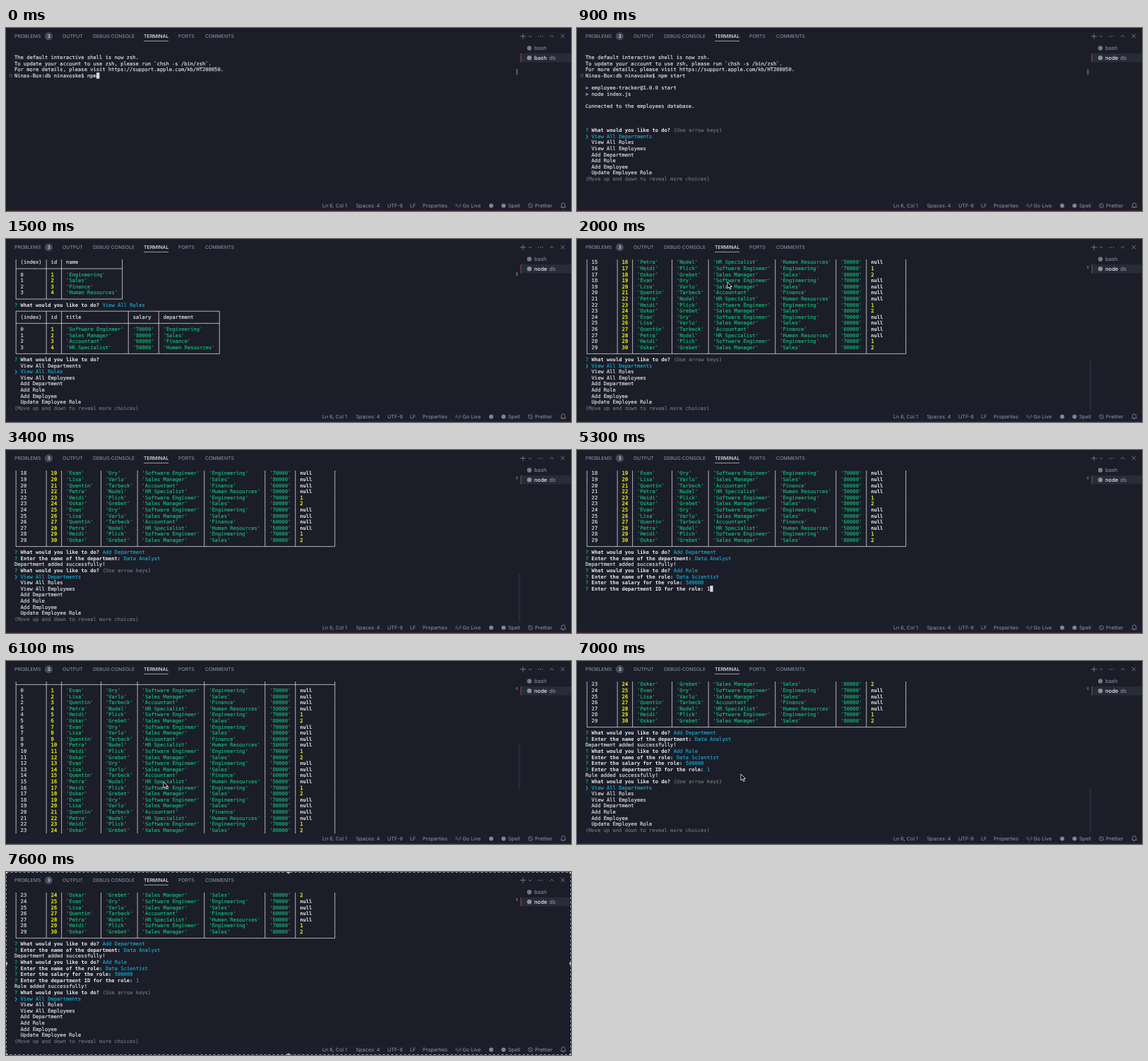
Animation of 800 by 259 pixels, one loop 7.7 s. Source, as an HTML page:

```html
<!DOCTYPE html>
<html lang="en">
<head>
<meta charset="utf-8">
<title>Terminal</title>
<style>
html, body { margin: 0; width: 100%; height: 100%; overflow: hidden; background: #1b1d28; }
svg { display: block; width: 100vw; height: 100vh; }
text { white-space: pre; text-rendering: geometricPrecision; }
#ui text { font: 7.2px Inter, "Open Sans", sans-serif; fill: #9298a7; }
#ui .tab text { font-size: 6.9px; }
#ui .list text { font-size: 7.6px; }
#ui .on { fill: #e8eaf0; font-weight: 500; }
.icon { fill: none; stroke: #9298a7; stroke-width: .7; }
#term text { font: 7.143px "DejaVu Sans Mono", "Liberation Mono", monospace; fill: currentColor; stroke: currentColor; stroke-width: .16; }
#term .w { color: #e2e3e8; }
#term .b { color: #e8e9ee; font-weight: bold; stroke: none; }
#term .g { color: #14bc7b; }
#term .y { color: #e8e81c; stroke-width: .3; }
#term .c { color: #17a8cd; }
#term .d { color: #6f727c; }
#term path { fill: none; stroke: #d3d4da; stroke-width: .85; }
</style>
</head>
<body>
<svg viewBox="0 0 800 259">
  <rect width="800" height="259" fill="#1b1d28"/>
  <rect y="244.5" width="800" height="14.5" fill="#1c1f2b"/>
  <rect y="258" width="800" height="1" fill="#42202f"/>
  <g id="ui">
    <g class="tab">
      <text x="12" y="14.2">PROBLEMS</text>
      <circle cx="60.5" cy="11.7" r="5.6" fill="#444957"/>
      <text x="58.4" y="14.2" class="on">3</text>
      <text x="80" y="14.2">OUTPUT</text>
      <text x="123" y="14.2">DEBUG CONSOLE</text>
      <text x="195" y="14.2" class="on">TERMINAL</text>
      <path d="M195 18.4h35" stroke="#b9bdc9" stroke-width=".8"/>
      <text x="244" y="14.2">PORTS</text>
      <text x="282" y="14.2">COMMENTS</text>
    </g>
    <path class="icon" d="M728 11.7h8M732 7.7v8M740 10.7l2.2 2.2 2.2-2.2M770 13.2l2.7-3 2.7 3M785.5 8.7l5.5 5.5m0-5.5l-5.5 5.5"/>
    <path class="icon" d="M753 11.8h1.2m1.8 0h1.2m1.8 0h1.2" style="stroke-width:1.1"/>
    <g class="list">
      <rect x="728" y="36" width="72" height="12.5" fill="#282b38"/>
      <rect x="728.6" y="36" width="1" height="12.5" fill="#a03a44"/>
      <circle cx="741" cy="28.5" r="3.2" fill="#757986"/>
      <circle cx="741" cy="42.3" r="3.2" fill="#8b8f9b"/>
      <text x="748" y="31.2">bash</text>
      <text id="proc" x="748" y="45" class="on">bash</text>
      <text x="769" y="45">db</text>
    </g>
    <text x="448" y="254">Ln 6, Col 1</text>
    <text x="495.5" y="254">Spaces: 4</text>
    <text x="540" y="254">UTF-8</text>
    <text x="572" y="254">LF</text>
    <text x="590" y="254">Properties</text>
    <path class="icon" d="M640.5 251v4M639 252.5a2 2 0 0 1 0-3M642 252.5a2 2 0 0 0 0-3M637.8 253.4a3.4 3.4 0 0 1 0-4.8M643.2 253.4a3.4 3.4 0 0 0 0-4.8" style="stroke-width:.5"/>
    <text x="646.5" y="254">Go Live</text>
    <circle cx="687" cy="251.5" r="3" fill="#7f8594"/>
    <circle cx="704.5" cy="251.5" r="3" fill="#7f8594"/>
    <text x="711" y="254">Spell</text>
    <path class="icon" d="M739.5 251.5a3 3 0 1 0 6 0a3 3 0 1 0-6 0M740.4 249.4l4.2 4.2"/>
    <text x="749" y="254">Prettier</text>
    <path class="icon" d="M785.5 253.5h7l-1-1.4v-2a2.5 2.5 0 0 0-5 0v2zM788 254.9h2"/>
  </g>
  <g id="term"></g>
  <path id="mouse" d="M0 0v9l2.1-2 1.6 3.4 1.5-.7-1.5-3.2h2.8z" fill="#000" stroke="#fff" stroke-width=".8"/>
  <g id="frame" fill="none">
    <rect x=".5" y=".5" width="799" height="258" stroke="#14151c"/>
    <rect x=".5" y=".5" width="799" height="258" stroke="#9c9ea6" stroke-dasharray="3 3"/>
    <path d="M.5 .5h0M400 .5h0M799.5 .5h0M.5 129.5h0M799.5 129.5h0M.5 258.5h0M400 258.5h0M799.5 258.5h0" stroke="#b4b6bd" stroke-width="4" stroke-linecap="round"/>
  </g>
</svg>
<script>
const LOOP = 7700, STEP = 100, ROWS = 25, CW = 4.3, LH = 8.6, LEFT = 12, TOP = 28.7;
const $ = id => document.getElementById(id);

// A line is a list of [style, text] runs; the style "cursor" draws a block.
const plain = s => [['w', s]];
const cursor = ['cursor', ' '];
const ask = q => [['g', '? '], ['b', q + ' ']];
const answer = (q, a) => [...ask(q), ['c', a]];
const typing = (q, a) => [...ask(q), ['w', a], cursor];

const todo = 'What would you like to do?';
const choices = ['View All Departments', 'View All Roles', 'View All Employees', 'Add Department',
  'Add Role', 'Add Employee', 'Update Employee Role', 'Exit'];

function menu(sel, fresh) {
  const first = Math.max(0, sel - 3);
  return [
    [...ask(todo), ['d', fresh ? '(Use arrow keys)' : '']],
    ...choices.slice(first, first + 7).map(c => c === choices[sel] ? [['c', '❯ ' + c]] : plain('  ' + c)),
    [['d', '(Move up and down to reveal more choices)']]
  ];
}

function table(heads, rows) {
  const show = v => typeof v === 'string' ? `'${v}'` : String(v);
  const style = v => typeof v === 'string' ? 'g' : v === null ? 'b' : 'y';
  const body = rows.map((r, i) => [['w', String(i)], ...[i + 1, ...r].map(v => [style(v), show(v)])]);
  const head = ['(index)', 'id', ...heads].map(h => ['w', h]);
  const widths = head.map((_, c) => Math.max(...[head, ...body].map(r => r[c][1].length)));
  const rule = ([l, m, r]) => plain(l + widths.map(w => '─'.repeat(w + 2)).join(m) + r);
  const row = r => [...r.flatMap(([s, v], c) => [['w', '│ '], [s, v.padEnd(widths[c] + 1)]]), ['w', '│']];
  return [rule('┌┬┐'), row(head), rule('├┼┤'), ...body.map(row), rule('└┴┘')];
}

const roles = [
  ['Software Engineer', '70000', 'Engineering'],
  ['Sales Manager', '80000', 'Sales'],
  ['Accountant', '60000', 'Finance'],
  ['HR Specialist', '50000', 'Human Resources']
];
const people = [['Evan', 'Ory'], ['Lisa', 'Varlo'], ['Quentin', 'Tarbeck'],
  ['Petra', 'Nodel'], ['Heidi', 'Plick'], ['Oskar', 'Grebet']];
const employees = Array.from({ length: 30 }, (_, i) => {
  const p = i % 6, [title, pay, dept] = roles[p % 4];
  return [...people[p], title, dept, pay, p < 4 ? null : p - 3];
});

const intro = ['', 'The default interactive shell is now zsh.',
  'To update your account to use zsh, please run `chsh -s /bin/zsh`.',
  'For more details, please visit https://support.apple.com/kb/HT208050.'].map(plain);
const host = 'Ninas-Box:db ninavoske$ ';
const shell = cmd => [...intro, [['w', host + cmd], cursor]];
const started = [...intro, ...[host + 'npm start', '', '> employee-tracker@1.0.0 start', '> node index.js', ''].map(plain)];
const connected = plain('Connected to the employees database.');

const deptQ = 'Enter the name of the department:';
const roleQ = ['Enter the name of the role:', 'Enter the salary for the role:', 'Enter the department ID for the role:'];
const roleA = ['Data Scientist', '500000', '1'];
const addDept = a => [answer(todo, choices[3]), typing(deptQ, a)];
const addRole = (n, a) => [answer(todo, choices[4]),
  ...roleQ.slice(0, n).map((q, i) => answer(q, roleA[i])), typing(roleQ[n], a)];

const blocks = [
  [...started, connected, [], [], []],
  [answer(todo, choices[0]), ...table(['name'], roles.map(r => [r[2]]))],
  [answer(todo, choices[1]), ...table(['title', 'salary', 'department'], roles)],
  [answer(todo, choices[2]), ...table(['first_name', 'last_name', 'title', 'department', 'salary', 'manager_id'], employees)],
  [answer(todo, choices[3]), answer(deptQ, 'Data Analyst'), plain('Department added successfully!')],
  [answer(todo, choices[4]), ...roleQ.map((q, i) => answer(q, roleA[i])), plain('Role added successfully!')]
];

// [start ms, finished blocks, lines still in progress]
const states = [
  [0, 0, shell('npm')], [100, 0, shell('npm s')], [200, 0, shell('npm st')],
  [300, 0, shell('npm star')], [400, 0, shell('npm start')],
  [500, 0, [...started, [cursor]]], [700, 0, [...started, connected, [], [cursor]]],
  [900, 1, menu(0, true)],
  [1100, 2, menu(0, true)], [1200, 2, menu(1)],
  [1400, 3, menu(0, true)], [1500, 3, menu(1)], [1600, 3, menu(2)],
  [1700, 4, menu(0, true)], [2800, 4, menu(1)], [2900, 4, menu(2)], [3000, 4, menu(3)],
  [3100, 4, addDept('')], [3200, 4, addDept('Data A')], [3300, 4, addDept('Data Analyst')],
  [3400, 5, menu(0, true)], [3600, 5, menu(1)], [3700, 5, menu(2)], [3800, 5, menu(3)], [3900, 5, menu(4)]
];
const typeRole = (t, n, size) => {
  for (let i = 0; i <= roleA[n].length; i += size, t += STEP) states.push([t, 5, addRole(n, roleA[n].slice(0, i))]);
};
typeRole(4000, 0, 2);
typeRole(4800, 1, 2);
typeRole(5200, 2, 1);
states.push([5500, 6, menu(0, true)]);

let base = 0;
const screens = states.map(([start, n, active]) => {
  const lines = [...blocks.slice(0, n).flat(), ...active];
  base = Math.max(base, lines.length - ROWS);
  return { start, lines, base };
});

// Keyed motion: [ms, values...]
const scrollKeys = [[2000, 0], [2300, 16], [2400, 16], [2600, 0], [5800, 0], [6100, 24], [6300, 30], [6400, 30], [7000, 0]];
const mouseKeys = [[1800, 240, 110], [2000, 213, 61], [2600, 218, 90], [5600, 260, 140], [6100, 223, 171],
  [6600, 228, 168], [7000, 232, 160], [7500, 420, 4]];
function at(keys, t) {
  const i = keys.findIndex(k => k[0] > t);
  if (i < 1) return keys.at(i).slice(1);
  const a = keys[i - 1], b = keys[i], f = (t - a[0]) / (b[0] - a[0]);
  return a.slice(1).map((v, j) => v + (b[j + 1] - v) * f);
}
const within = (t, ...spans) => spans.some(([a, b]) => t >= a && t < b);

const arms = { '│': 'ud', '─': 'lr', '┌': 'rd', '┐': 'ld', '└': 'ru', '┘': 'lu',
  '├': 'urd', '┤': 'uld', '┬': 'lrd', '┴': 'lru', '┼': 'lrud' };
const stroke = { u: 'v' + -LH / 2, d: 'v' + LH / 2, l: 'h' + -CW / 2, r: 'h' + CW / 2 };

function drawLine(line, row) {
  const y = TOP + row * LH;
  let col = 0, out = '', path = '';
  for (const [style, s] of line) {
    const x = LEFT + col * CW;
    if (style === 'cursor') out += `<rect x="${x}" y="${y}" width="${CW}" height="${LH}" fill="#d8dae0"/>`;
    [...s].forEach((ch, i) => {
      for (const a of arms[ch] || '') path += `M${x + (i + .5) * CW} ${y + LH / 2 + .4}${stroke[a]}`;
    });
    const words = s.replace(/[─-┼]/g, ' ');
    if (words.trim()) out += `<text class="${style}" x="${x}" y="${y + 6.75}">${words.trimEnd().replace('>', '&gt;')}</text>`;
    col += s.length;
  }
  return out + (path && `<path d="${path}"/>`);
}

function draw(t) {
  const { lines, base } = screens.findLast(s => s.start <= t);
  const top = base - Math.round(at(scrollKeys, t)[0]);
  const total = base + ROWS, height = ROWS * LH;
  let out = lines.slice(top, top + ROWS).map(drawLine).join('');
  if (top <= 4) out += `<circle cx="7" cy="${TOP + (4.5 - top) * LH}" r="2" fill="none" stroke="#6d7280" stroke-width=".7"/>`;
  const mark = Math.max(4, height / total);
  out += `<rect x="722.3" y="${29 + 830 / total - mark / 2}" width="2.2" height="${mark}" fill="#565a68"/>`;
  if (within(t, [1700, 2700], [3400, 3500], [5500, 7200]))
    out += `<rect x="725" y="${TOP + top / total * height}" width="3.4" height="${ROWS / total * height}" fill="#252834"/>`;
  $('term').innerHTML = out;
  $('proc').textContent = t < 500 ? 'bash' : 'node';
  $('mouse').setAttribute('transform', `translate(${at(mouseKeys, t)})`);
  $('mouse').style.display = within(t, [1800, 2700], [5600, 7500]) ? '' : 'none';
  $('frame').style.display = t >= 7600 ? '' : 'none';
}

let last = -1;
function tick() {
  const t = Math.floor(performance.now() % LOOP / STEP) * STEP;
  if (t !== last) draw(last = t);
  requestAnimationFrame(tick);
}
tick();
</script>
</body>
</html>
```
